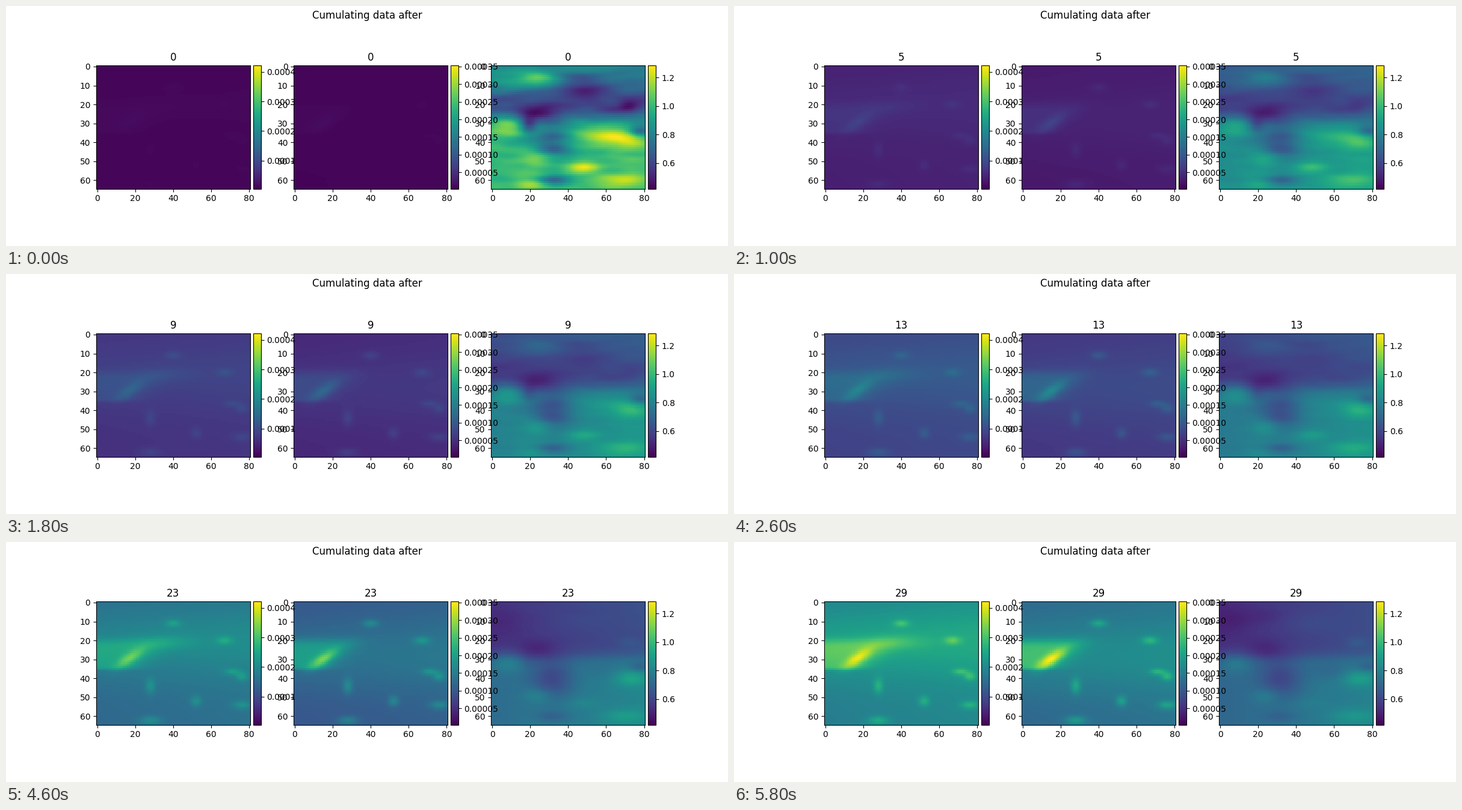
These frames come from a looping animation (1200 by 400 pixels, 6 s). A matplotlib script:

```python
import numpy as np
import matplotlib.pyplot as plt
from matplotlib.animation import FuncAnimation
from mpl_toolkits.axes_grid1 import make_axes_locatable

ROWS, COLS, STEPS = 65, 81, 30
Y, X = np.mgrid[0:ROWS, 0:COLS].astype(float)


def ramp(d):
    """Soft step from 0 to 1 around d = 0."""
    return 0.5 + 0.5 * np.tanh(d / 2)


def bump(x, y, w, h, slope=0.0):
    """Gaussian hill, its long axis rising by slope to the right."""
    dx, dy = X - x, Y - y
    return np.exp(-(dx / w) ** 2 / 2 - ((dy + slope * dx) / h) ** 2 / 2)


HOT_SPOTS = [(40, 11, 3, 1.5), (67, 20, 3, 1.5), (76, 39, 2.2, 1.6),
             (71, 36.5, 3, 1.2), (28, 44, 1.8, 3), (52, 52, 2, 2),
             (76, 54, 3.5, 1.6), (28, 62, 4, 1.6)]


def total(floor, band, centre, reach, wedge, peak, spot):
    """Amount gathered by the end of the run, as a share of the scale."""
    field = floor + 0.05 * X / COLS
    field = field + band * np.exp(-((Y - centre) / 20) ** 2)
    edge = reach - 1.2 * (Y - 27)
    strip = ramp((Y - 20) / 1.2) * ramp((35.3 - Y) / 0.4)
    field += wedge * strip * ramp((edge - X) / 4)
    field += peak[0] * bump(peak[1], peak[2], 5, 2.4, 0.55)
    return field + spot * sum(bump(*s) for s in HOT_SPOTS)


total_a = (total(0.42, 0.14, 21, 29, 0.2, (0.26, 17, 29.5), 0.16)
           + 0.09 * bump(38, 21, 12, 3))
total_b = total(0.33, 0.12, 28, 25, 0.25, (0.34, 15, 30), 0.18)

# x, y, width, height, gain at the start, gain at the end
LAYERS = [(24, 7, 7, 3, .33, -.03), (6, 9, 8, 5, .12, -.05),
          (47, 11, 10, 4, -.2, .03), (24, 25, 7, 4, -.18, -.06),
          (72, 21, 4, 2, -.2, .05), (8, 31, 6, 4, .2, .1),
          (19, 31, 3, 3, -.35, 0), (32, 40, 8, 7, -.28, -.16),
          (60, 36, 9, 3.5, .28, -.06), (73, 40, 6, 3, .2, .14),
          (78, 34, 4, 2, -.35, -.1), (24, 49, 5, 3, .15, .08),
          (48, 53, 6, 2, .3, .03), (70, 60, 9, 3, .25, .1),
          (22, 62, 7, 1.8, .25, 0), (32, 60, 6, 2, -.35, -.06)]


def grain(seed):
    """Faint random streaks, stretched sideways."""
    noise = np.random.default_rng(seed).normal(size=(ROWS, COLS))
    for axis, width in ((0, 1.3), (1, 5)):
        k = np.exp(-(np.arange(-12, 13) / width) ** 2 / 2)
        noise = np.apply_along_axis(np.convolve, axis, noise, k, "same")
    return noise / noise.std()


low_half = ramp((Y - 29) / 2)
first = (0.44 - 0.24 * np.exp(-((Y - 19) / 8) ** 2) + 0.22 * low_half
         + 0.03 * grain(4))
last = 0.13 + 0.2 * low_half + 0.11 * X / COLS
for *shape, begin, finish in LAYERS:
    first += begin * bump(*shape)
    last += finish * bump(*shape)


def levels(step):
    share = (step + 1) / STEPS
    settle = np.log(step + 1) / np.log(STEPS)
    ratio = first + (last - first) * settle
    return total_a * share, total_b * share, ratio


limits = [(4.3e-6, 4.215e-4), (3e-6, 3.527e-4), (0.421, 1.283)]

fig, axes = plt.subplots(1, 3, figsize=(12, 4), dpi=100)
fig.suptitle("Cumulating data after", y=0.983)
images = []
for ax, (low, high) in zip(axes, limits):
    image = ax.imshow(np.full((ROWS, COLS), low), vmin=low, vmax=high)
    cax = make_axes_locatable(ax).append_axes("right", size="5%", pad=0.05)
    fig.colorbar(image, cax=cax)
    images.append(image)


def update(step):
    for ax, image, (low, high), level in zip(axes, images, limits,
                                             levels(step)):
        image.set_data(low + (high - low) * np.clip(level, 0, 1))
        ax.set_title(str(step))
    return images


anim = FuncAnimation(fig, update, frames=STEPS, interval=200,
                     init_func=lambda: update(0), repeat=True, repeat_delay=0)
plt.show()
```
